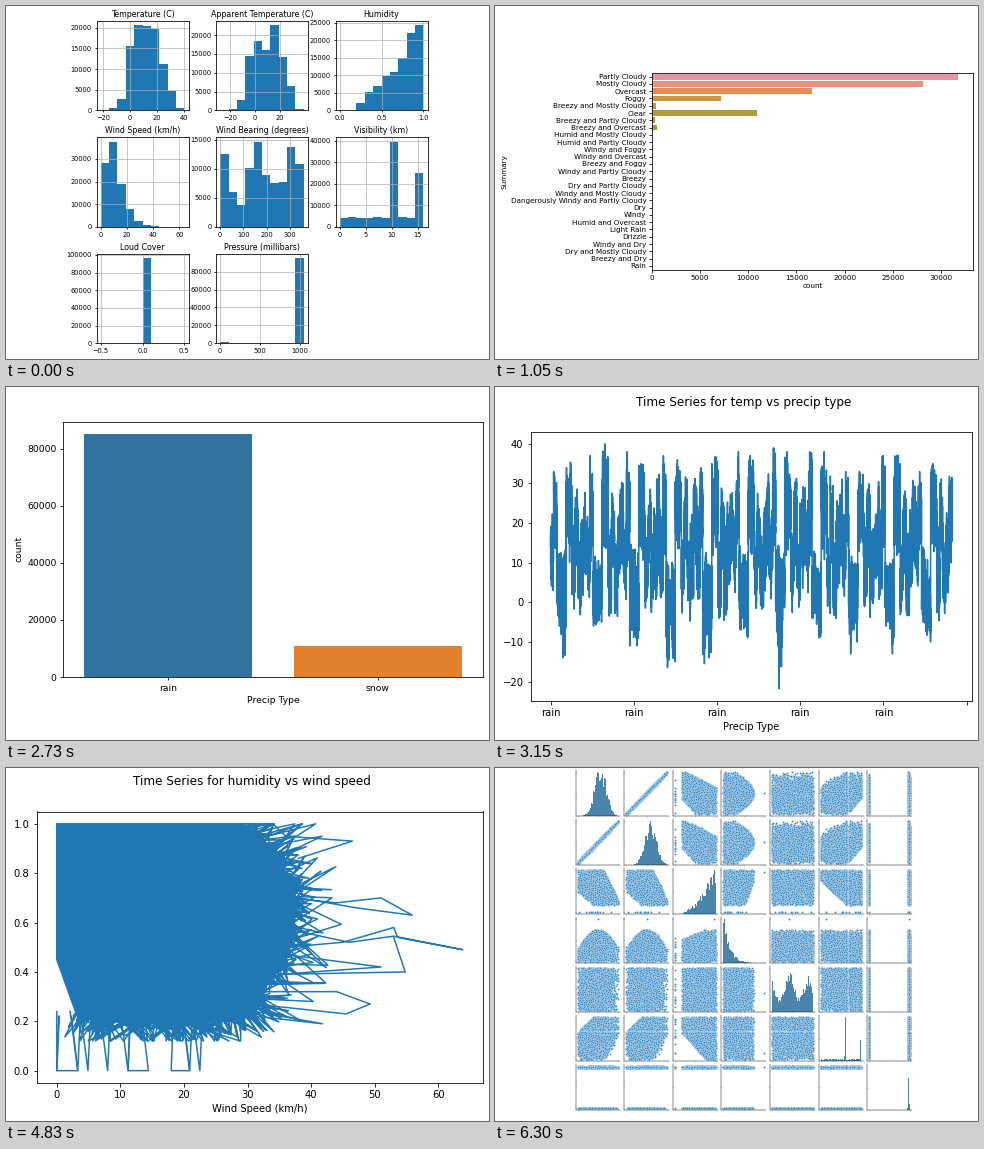
Recreate the animation shown at these times as a matplotlib script. Size 483 px wide and 353 px high, loop 7.35 s.

```python
import matplotlib.pyplot as plt
import numpy as np
from matplotlib.animation import FuncAnimation

W, H, DPI = 483, 353, 72  # at 72 dpi one point is one pixel
BLUE = "#1f77b4"
fig = plt.figure(figsize=(W / DPI, H / DPI), dpi=DPI, facecolor="white")
scenes = []


def panel(x0, y0, x1, y1, s):
    """Axes given by pixel edges (y down), styled at scale s, in the newest scene."""
    ax = fig.add_axes([x0 / W, 1 - y1 / H, (x1 - x0) / W, (y1 - y0) / H])
    ax.tick_params(length=3.5 * s, pad=3.5 * s, width=0.8, labelsize=10 * s)
    ax.xaxis.labelpad = ax.yaxis.labelpad = 4 * s
    ax.xaxis.label.set_size(10 * s)
    ax.yaxis.label.set_size(10 * s)
    for spine in ax.spines.values():
        spine.set_linewidth(0.8)
    scenes[-1].append(ax)
    return ax


def heading(ax, x, y, text, size):
    ax.text(x / W, 1 - y / H, text, size=size, ha="center", va="center",
            transform=fig.transFigure)


def histogram(title, lo, hi, x_step, y_step, counts):
    """One of the small histograms, placed in reading order; counts in hundreds."""
    s = 0.66
    row, col = divmod(len(scenes[-1]), 3)
    x, y = 90.5 + 119.5 * col, 15 + 116.4 * row
    ax = panel(x, y, x + 92, y + 89.5, s)
    width = (hi - lo) / 10
    heights = np.zeros(10)
    heights[:len(counts)] = counts
    heights *= 100
    ax.bar(lo + width * np.arange(10), heights, width, align="edge", color=BLUE)
    top = heights.max() * 1.05
    first = np.ceil(lo / x_step) * x_step
    ax.set(xlim=(lo - width / 2, hi + width / 2), ylim=(0, top),
           xticks=np.arange(first, hi + 0.01 * width, x_step),
           yticks=np.arange(0, top, y_step))
    ax.grid(True, color="#b0b0b0", linewidth=0.7)
    ax.set_title(title, fontsize=12 * s, pad=6 * s)


def histograms():
    bins = np.arange(10)
    visibility = np.where(bins == 6, 395, np.where(bins == 9, 251, 43 + 4 * np.sin(2 * bins)))
    histogram("Temperature (C)", -21.8, 40, 20, 5000,
              [1, 6, 27, 157, 206, 205, 196, 112, 48, 6])
    histogram("Apparent Temperature (C)", -27.7, 39.3, 20, 5000,
              [1, 5, 29, 145, 184, 160, 226, 142, 66, 5])
    histogram("Humidity", 0, 1, 0.5, 5000,
              [0, 0, 20, 54, 69, 97, 109, 149, 221, 243])
    histogram("Wind Speed (km/h)", 0, 63.85, 20, 10000,
              [283, 376, 190, 80, 24, 8, 2])
    histogram("Wind Bearing (degrees)", 0, 359, 100, 5000,
              [125, 61, 38, 102, 147, 90, 76, 78, 138, 109])
    histogram("Visibility (km)", 0, 16.1, 5, 10000, visibility)
    histogram("Loud Cover", -0.5, 0.5, 0.5, 20000, 964.5 * (bins == 5))
    histogram("Pressure (millibars)", 0, 1046, 500, 20000,
              951.6 * (bins == 9) + 12.9 * (bins == 0))


def summary_counts():
    names = [
        "Partly Cloudy", "Mostly Cloudy", "Overcast", "Foggy",
        "Breezy and Mostly Cloudy", "Clear", "Breezy and Partly Cloudy",
        "Breezy and Overcast", "Humid and Mostly Cloudy",
        "Humid and Partly Cloudy", "Windy and Foggy", "Windy and Overcast",
        "Breezy and Foggy", "Windy and Partly Cloudy", "Breezy",
        "Dry and Partly Cloudy", "Windy and Mostly Cloudy",
        "Dangerously Windy and Partly Cloudy", "Dry", "Windy",
        "Humid and Overcast", "Light Rain", "Drizzle", "Windy and Dry",
        "Dry and Mostly Cloudy", "Breezy and Dry", "Rain",
    ]
    n = len(names)
    counts = np.full(n, 25)
    counts[:8] = 31733, 28094, 16597, 7148, 516, 10890, 386, 528
    counts[names.index("Dry and Partly Cloudy")] = 86
    colors = ["#ea92a2", "#e99080", "#e18e58", "#ce9242", "#be9640", "#b29a3e",
              "#a89d40", "#9ea042"] + ["#46a8b2"] * (n - 8)
    ax = panel(156.5, 67, 478.5, 263.5, 0.72)
    ax.barh(range(n), counts, 0.8, color=colors)
    ax.set(xlim=(0, 33320), ylim=(n - 0.5, -0.5), xlabel="count", ylabel="Summary",
           xticks=range(0, 30001, 5000))
    ax.set_yticks(range(n), names)


def precip_counts():
    ax = panel(57, 34.5, 477, 290, 0.93)
    ax.bar([0, 1], [85224, 10712], 0.8, color=["#3274a1", "#e1812c"])
    ax.set(xlim=(-0.5, 1.5), ylim=(0, 89485), xlabel="Precip Type", ylabel="count",
           yticks=range(0, 80001, 20000))
    ax.set_xticks([0, 1], ["rain", "snow"])


def temperatures():
    """Eleven years of readings, the months of each year in alphabetical order."""
    rng = np.random.default_rng(7)
    months = np.array([4, 8, 12, 2, 1, 7, 6, 3, 5, 11, 10, 9])
    season = np.cos(np.pi * (months - 1) / 6)
    jan_low = [-14, -5, -11, -15, -14, -9, -9, -9, -10, -13, -10]
    dec_low = [-6, -6, -11, -16.5, -15.5, -7, -11, -4, -13, -6, -5]
    aug_high = [33, 37, 38, 37, 34, 38, 39, 38, 33, 37, 33]
    jul_high = [34, 40, 35, 36, 35, 37, 38, 38, 33, 37, 35]
    steps = np.arange(240)
    kernel = np.exp(-np.arange(40) / 14)
    out = []
    for year in range(11):
        lo = 1.5 - 11 * season + rng.uniform(-1, 3, 12)
        hi = 23 - 13 * season + rng.uniform(-2, 3, 12)
        lo[months == 1] = jan_low[year]
        lo[months == 12] = dec_low[year]
        hi[months == 8] = aug_high[year]
        hi[months == 7] = jul_high[year]
        if year == 6:
            lo[months == 2] = -21.8
        for a, b in zip(lo, hi):
            weather = np.convolve(rng.normal(size=279), kernel, "valid")
            z = weather / weather.std() + 1.1 * np.sin(steps * np.pi / 4)
            out.append(a + (b - a) * (z - z.min()) / np.ptp(z))
    return np.concatenate(out)


def temp_series(box, s, title, title_at, label, ticks):
    ax = panel(*box, s)
    y = temperatures()
    ax.plot(np.linspace(0, 96453, len(y)), y, color=BLUE, linewidth=1.5 * s)
    ax.set(xlim=(-4823, 101276), ylim=(-24.9, 42.99), xlabel=label,
           yticks=range(-20, 41, 10))
    ax.set_xticks(range(0, 100001, 20000), ticks + [""])
    heading(ax, *title_at, title, 12 * s)


def humidity_vs_wind():
    rng = np.random.default_rng(3)
    ax = panel(30.5, 43.5, 477, 315, 1)
    edge = np.array([(28, 1), (34, 0.9), (37.5, 0.7), (36, 0.46), (31, 0.27),
                     (26, 0.21), (18, 0.185), (8, 0.2), (3, 0.235), (0, 0.45), (0, 1)])
    ax.fill(*edge.T, facecolor=BLUE, edgecolor=BLUE, linewidth=1.5)

    def line(points):
        ax.plot(*np.transpose(points), color=BLUE, linewidth=1.5)

    def rim(u, k):
        mid = np.array([15, 0.62])
        p = np.column_stack([np.interp(u, range(len(edge)), c) for c in edge.T])
        return mid + (p - mid) * np.reshape(k, (-1, 1))

    # thin strokes out of the solid core and back
    n = 420
    u = rng.uniform(0, 8, n)
    reach = 1 + np.minimum(rng.exponential(0.11, n), 0.36)
    ends = [rim(np.clip(u + rng.uniform(-0.5, 0.5, n), 0, 8), 0.95) for _ in "ab"]
    path = np.stack([ends[0], rim(u, reach), ends[1]], axis=1).reshape(-1, 2)
    line(np.column_stack([path[:, 0].clip(0, 46.5), path[:, 1].clip(0.12, 1)]))

    # dips to zero humidity, sharp or with a flat floor
    for w in (0, 3.3, 4.9, 8, 11.2, 20.9, 22.5):
        line([(max(w - 1.2, 0), 0.24), (w, 0), (w + 0.4, 0.22)])
    for a, b in ((0, 3.3), (11.2, 14.4), (18, 20.9)):
        line([(a + 0.3, 0.22), (a, 0), (b, 0), (b - 1, 0.22)])

    # the windiest hours
    line([(28, 1), (34, 1), (36, 0.95), (46.5, 0.93), (38, 0.86)])
    line([(36, 0.7), (44, 0.68), (51, 0.7), (55.9, 0.63), (47, 0.66), (36, 0.71)])
    line([(36, 0.5), (45, 0.52), (53, 0.58), (53.6, 0.54), (63.85, 0.49),
          (53, 0.545), (46, 0.52), (37, 0.57)])
    line([(53, 0.54), (54.8, 0.4), (35, 0.39), (51, 0.42), (36, 0.47)])
    line([(33, 0.32), (44, 0.32), (49.3, 0.27), (45.5, 0.23), (31, 0.27)])
    line([(28, 0.23), (41.8, 0.19), (29, 0.25)])
    line([(20, 0.19), (28.9, 0.12), (29, 0.24)])
    ax.set(xlim=(-3.19, 67.04), ylim=(-0.05, 1.05), xlabel="Wind Speed (km/h)",
           xticks=range(0, 61, 10), yticks=np.arange(6) / 5)
    heading(ax, 246, 13, "Time Series for humidity vs wind speed", 12)


def pair_data(rng):
    """Seven variables scaled to 0..1, spread over their joint outlines."""
    t, h, w, b, v = rng.uniform(size=(5, 11000))
    inside = ((h > np.maximum(0.17, 0.5 - 0.9 * t)) & (h < 1.05 - 1.9 * (t - 0.6))
              & (w < 0.3 + 0.45 * np.sin(np.pi * t)) & (w < 0.45 + 0.4 * h)
              & (v < 0.65 + 0.9 * t) & (v > 0.5 * (t - 0.6)) & (h > 0.75 - 0.9 * v))
    t, h, w, b, v = (c[inside] for c in (t, h, w, b, v))
    a = (t + rng.normal(0, 0.014, len(t))).clip(0, 1)
    v = np.where(abs(v - 0.67) < 0.025, 0.62, v)
    h[:14] = 0
    t[14], a[14], w[14] = 0.5, 0.5, 1
    p = rng.normal(0.972, 0.009, len(t)).clip(0.945, 1)
    p[rng.uniform(size=len(t)) < 0.12] = 0
    return [t, a, h, w, b, v, p]


def pair_grid():
    rng = np.random.default_rng(11)
    data = pair_data(rng)
    x = (np.arange(60) + 0.5) / 60

    def bump(mid, spread):
        return np.exp(-((x - mid) / spread) ** 2)

    shapes = [
        bump(0.56, 0.2),
        bump(0.6, 0.2),
        np.where(x > 0.2, x ** 2.2, 0),
        np.exp(-7 * x),
        0.3 + 0.6 * bump(0.43, 0.12) + 0.5 * bump(0.88, 0.1) + 0.4 * bump(0, 0.06),
        0.04 + bump(0.61, 0.012) + 0.65 * bump(0.98, 0.01),
        bump(0.97, 0.015),
    ]
    for row in range(7):
        for col in range(7):
            left, top = 80.5 + 48.6 * col, 2 + 49 * row
            ax = panel(left, top, left + 45, top + 46, 0.2)
            ax.spines[["top", "right"]].set_visible(False)
            for side in ("left", "bottom"):
                ax.spines[side].set_linewidth(0.45)
            ax.tick_params(labelbottom=False, labelleft=False, width=0.3)
            ax.set(xlim=(-0.05, 1.05), xticks=(0, 0.5, 1), yticks=(0, 0.5, 1))
            if row == col:
                bars = shapes[row] * rng.uniform(0.6, 1, 60)
                ax.bar(x, bars / bars.max(), 1 / 60, color="#4a85ae")
                ax.set_ylim(0, 1.05)
            else:
                ax.plot(data[col], data[row], "o", color="#2f86c4", markersize=2,
                        markeredgecolor="white", markeredgewidth=0.25)
                ax.set_ylim(-0.05, 1.05)


def precip_series():
    temp_series((35.5, 45, 477, 314), 1, "Time Series for temp vs precip type",
                (249, 15), "Precip Type", ["rain"] * 5)


def daily_series():
    ticks = ["Partly cloudy throughout the day.",
             "Mostly cloudy starting overnight continuing until evening.",
             "Mostly cloudy throughout the day.",
             "Partly cloudy throughout the day.",
             "Foggy starting overnight continuing until morning."]
    temp_series((60.5, 62, 445.5, 295.5), 0.87, "Time Series for temp vs Daily summary",
                (246, 35), "Daily Summary", ticks)


for build in (histograms, summary_counts, precip_counts, precip_series,
              humidity_vs_wind, daily_series, pair_grid):
    scenes.append([])
    build()


def show(i):
    for k, axes in enumerate(scenes):
        for ax in axes:
            ax.set_visible(k == i)
    return scenes[i]


anim = FuncAnimation(fig, show, frames=len(scenes), init_func=lambda: show(0),
                     interval=1050, repeat=True, repeat_delay=0)
plt.show()
```
